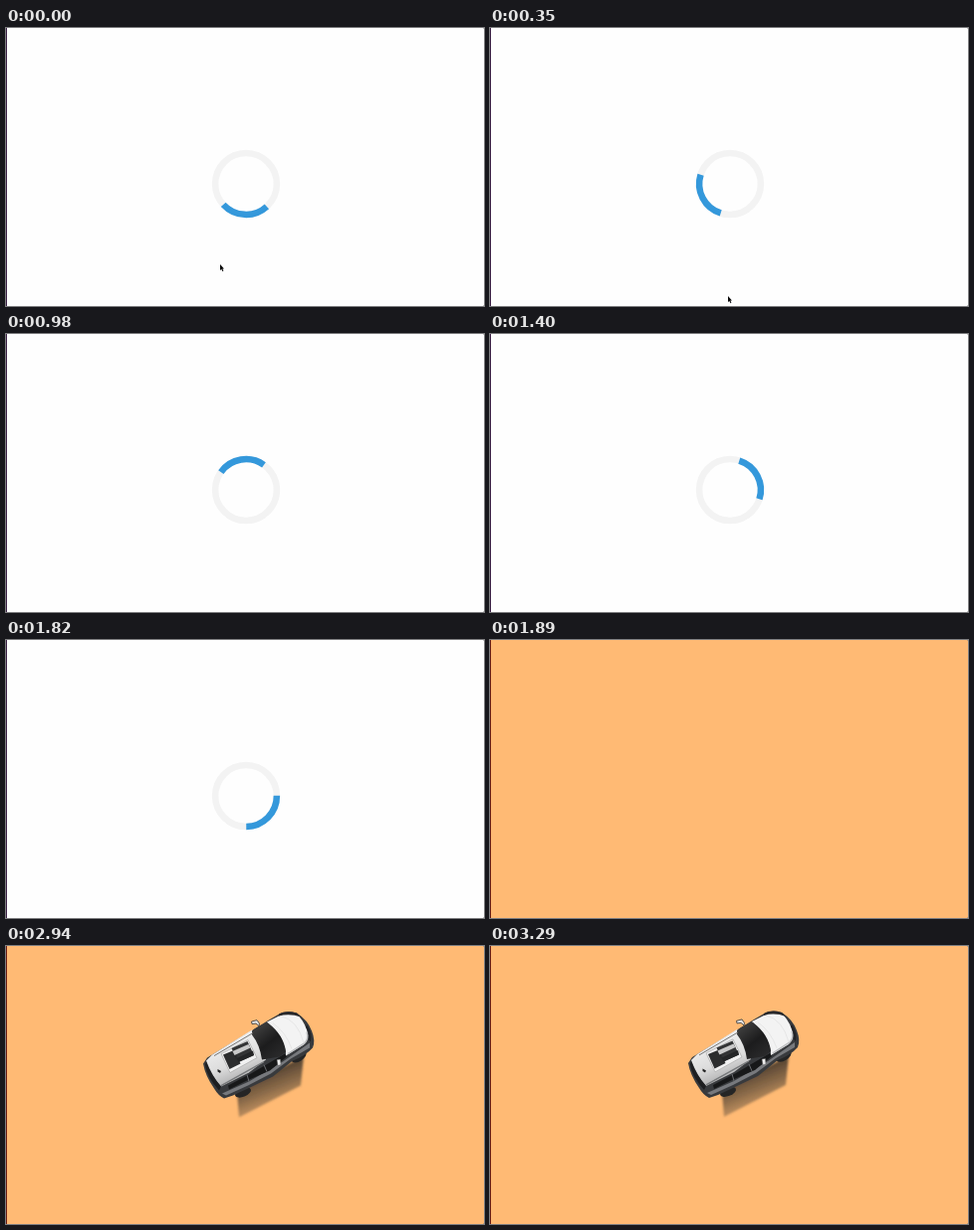
Write an HTML page that moves like this. It is 480x280 px and loops after 3430 ms.

```html
<!DOCTYPE html>
<html lang="en">
<head>
<meta charset="utf-8">
<title>Loader and car</title>
<style>
html, body { margin: 0; width: 100%; height: 100%; overflow: hidden; background: #fff; }
svg { display: block; width: 480px; height: 280px; }
</style>
</head>
<body>
<svg viewBox="0 0 480 280">
  <defs>
    <linearGradient id="shade" gradientUnits="userSpaceOnUse" x1="256" y1="134" x2="267" y2="161">
      <stop offset="0" stop-color="#43362b" stop-opacity=".85"/>
      <stop offset=".5" stop-color="#5a4937" stop-opacity=".7"/>
      <stop offset="1" stop-color="#7d6347" stop-opacity=".5"/>
    </linearGradient>
    <linearGradient id="paint" gradientUnits="userSpaceOnUse" x1="245" y1="80" x2="264" y2="128">
      <stop offset="0" stop-color="#f4f4f4"/>
      <stop offset=".6" stop-color="#dcdcdc"/>
      <stop offset="1" stop-color="#a9a9aa"/>
    </linearGradient>
    <linearGradient id="glass" gradientUnits="userSpaceOnUse" x1="252" y1="84" x2="274" y2="112">
      <stop offset="0" stop-color="#3a3a3a"/>
      <stop offset=".5" stop-color="#1c1c1d"/>
      <stop offset="1" stop-color="#2a2a2b"/>
    </linearGradient>
    <filter id="soft"><feGaussianBlur stdDeviation="1.1"/></filter>
  </defs>
  <rect id="back" width="480" height="280"/>

  <g id="loader" fill="none" stroke-width="6.5">
    <circle cx="241" cy="157" r="30.9" stroke="#f3f3f3"/>
    <path id="arc" d="M262.85 135.15A30.9 30.9 0 0 1 262.85 178.85" stroke="#3498db"/>
  </g>
  <path id="cursor" d="M0 0V6L1.4 4.9L2.5 7.2L3.4 6.8L2.4 4.5H4Z" fill="#080808"/>

  <g id="car">
    <path d="M230 148L232 174L294 142L297 112Z" fill="url(#shade)" filter="url(#soft)"/>
    <ellipse cx="236" cy="149" rx="8.5" ry="4.2" transform="rotate(-22 236 149)" fill="#252525"/>
    <ellipse cx="292" cy="113" rx="8.5" ry="4.5" transform="rotate(-32 292 113)" fill="#252525"/>
    <!-- lower body -->
    <path d="M196 120L200 114L246 86L262 76L274 69Q282 66 290 69Q301 76 305 87Q309 97 306 104Q299 112 286 117L266 133L243 144L226 152L217 155Q211 152 207 145Q198 132 196 120Z" fill="#383a3d"/>
    <path d="M215 150L242 138L276 118L303 99L303 104L284 115L264 130L241 142L219 152Z" fill="#77797d"/>
    <path d="M221 142L244 130L278 110L280 113L263 127L240 137L222 146Z" fill="#171819"/>
    <path d="M257 121L260 128M240 131L242 138" stroke="#6a6c70"/>
    <!-- roof and hood -->
    <path d="M199 117L205 111L245 86L256 94L259 116L242 129L214 143Q205 133 199 117Z" fill="url(#paint)"/>
    <path d="M199 118Q204 132 214 143L212 147Q200 134 198 121Z" fill="#1d1e20"/>
    <path d="M260 78L274 71Q284 67 292 72Q299 80 301 90Q302 96 297 101L279 112Q280 98 260 78Z" fill="#f3f3f3"/>
    <path d="M281 110L298 99Q302 95 300 88" fill="none" stroke="#bfc0c2" stroke-width="1.5"/>
    <path d="M266 79Q279 88 285 105M274 72Q291 76 297 99" fill="none" stroke="#e2e2e2" stroke-width=".8"/>
    <path d="M272 70Q279 66 290 69L294 73Q283 69 272 72Z" fill="#29292b"/>
    <path d="M300 81Q306 90 304 98L302 96Q303 89 299 83Z" fill="#202124"/>
    <path d="M245 87Q252 81 261 79Q277 91 279 108L273 113L255 116Q253 101 245 91Z" fill="url(#glass)"/>
    <path d="M207 112L246 89" stroke="#777" stroke-width="1"/>
    <path d="M214 142L257 118" stroke="#77797b" stroke-width="1.3"/>
    <!-- sunroof -->
    <path d="M214 110L241 96L250 114L223 129Z" fill="#f0f0f0" stroke="#aaa" stroke-width=".7"/>
    <path d="M224.5 104.5L240.5 97.5L247 111.5L231.5 118.5Z" fill="#333435"/>
    <path d="M216 111L227 106.5L233.5 120L222.5 125.5Z" fill="#2c2d2e"/>
    <path d="M225 105L229 115L246 107L247 111.5L231.5 118.5Z" fill="#242526"/>
    <path d="M225.5 107.5L241.5 100.5L243.5 104L227.5 111.5Z" fill="#c9c9c9"/>
    <path d="M210.5 125.5L214 127.5L213 129.5L210.5 128Z" fill="#222"/>
    <!-- mirrors -->
    <path d="M244.5 77.5L250 76L252.5 79.5L252 82L249 79.5L245 80Z" fill="#e0e0e0" stroke="#333" stroke-width=".8"/>
    <path d="M270 116L273.5 115.5L274 121L271 122Z" fill="#eee" stroke="#555" stroke-width=".5"/>
  </g>

  <rect id="edge" width="1" height="280"/>
  <path d="M479 0h1v1h-1zM479 279h1v1h-1z" fill="#777" opacity=".4"/>
</svg>
<script>
const LOOP = 3430, STEP = 70, ORANGE_AT = 1890, CAR_AT = 2800;
const el = id => document.getElementById(id);
const show = (id, on) => el(id).setAttribute('visibility', on ? 'visible' : 'hidden');
const move = (id, x, y) => el(id).setAttribute('transform', `translate(${x} ${y})`);
const ease = p => (1 - Math.cos(Math.PI * Math.min(1, Math.max(0, p)))) / 2;
const start = performance.now();

function draw(now) {
  const time = Math.max(0, now - start) % LOOP;
  const t = Math.floor(time / STEP) * STEP;
  const loading = t < ORANGE_AT;

  el('back').setAttribute('fill', loading ? '#fefefe' : '#ffba74');
  el('edge').setAttribute('fill', loading ? '#3c2146' : '#6a1d13');
  show('loader', loading);
  show('cursor', t < 490);
  show('car', t >= CAR_AT);

  el('arc').setAttribute('transform', `rotate(${92.5 + 12 * t / STEP} 241 157)`);
  move('cursor', 215 + 24 * t / 350, 238 + 32 * t / 350);

  // The car nudges forward, then settles back slightly.
  const reach = 4 * ease((t - CAR_AT) / 280) - ease((t - 3150) / 140);
  move('car', reach, -0.7 * reach);
  requestAnimationFrame(draw);
}
draw(start);
</script>
</body>
</html>
```
